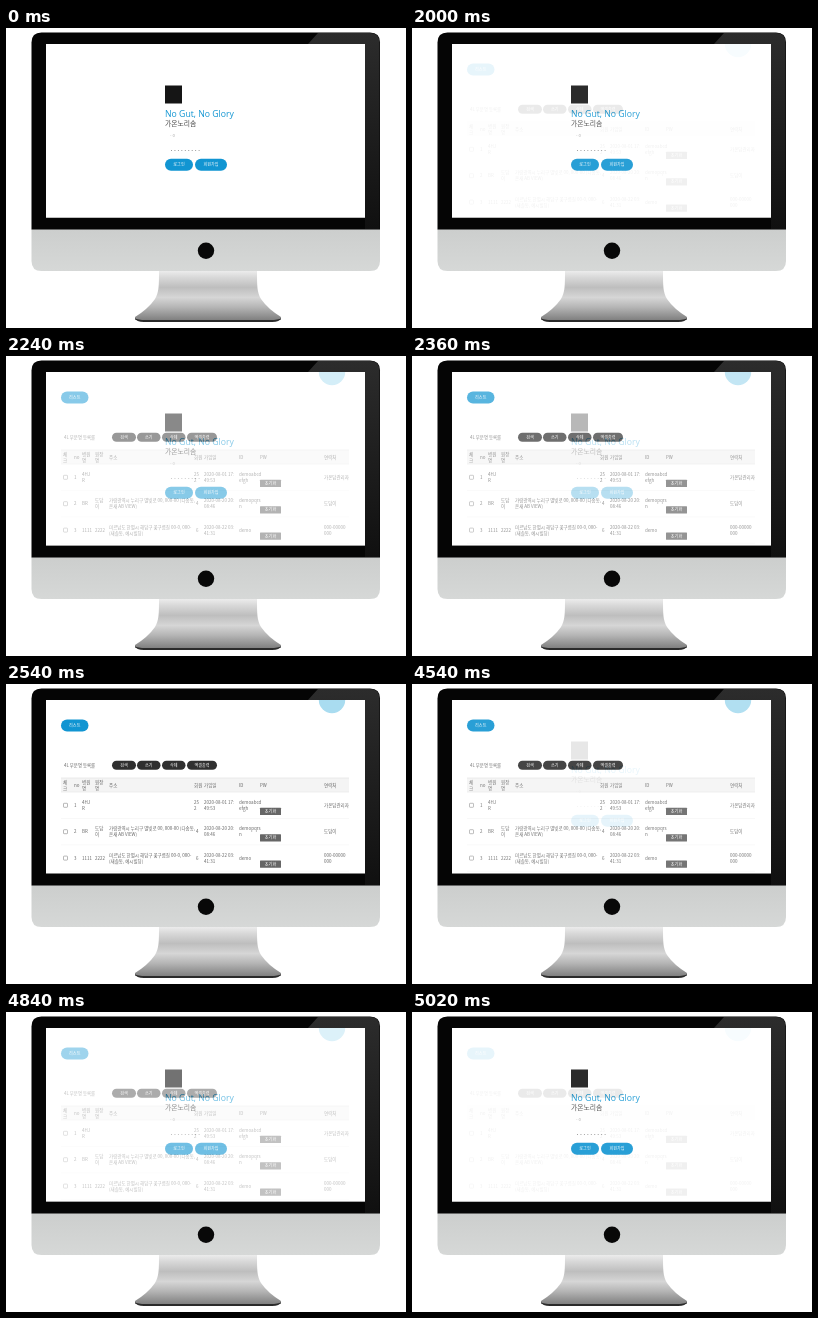
An HTML page that plays this animation: 400 by 300 pixels, repeating every 5080 ms.

```html
<!DOCTYPE html>
<html>
<head>
<meta charset="utf-8">
<title>Desktop screen crossfade</title>
<style>
  html, body { margin: 0; width: 100%; height: 100%; overflow: hidden; background: #fff; }
  svg { display: block; width: 100vw; height: 100vh; }
  text { font-family: "Noto Sans CJK KR", "Noto Sans CJK", "Noto Sans", sans-serif; white-space: pre; }
</style>
</head>
<body>
<svg viewBox="0 0 400 300">
  <defs>
    <linearGradient id="chin" x1="0" y1="0" x2="0" y2="1">
      <stop offset="0" stop-color="#cccecd"/>
      <stop offset="1" stop-color="#d6d8d7"/>
    </linearGradient>
    <linearGradient id="glare" x1="0" y1="0" x2="0" y2="1">
      <stop offset="0" stop-color="#2c2c2c"/>
      <stop offset="1" stop-color="#101010"/>
    </linearGradient>
    <linearGradient id="neck" x1="0" y1="0" x2="0" y2="1">
      <stop offset="0" stop-color="#efefef"/>
      <stop offset=".15" stop-color="#d8d8d8"/>
      <stop offset=".35" stop-color="#bebebe"/>
      <stop offset=".55" stop-color="#d6d6d6"/>
      <stop offset=".75" stop-color="#b4b4b4"/>
      <stop offset="1" stop-color="#808080"/>
    </linearGradient>
    <clipPath id="glass"><rect x="40" y="16" width="319" height="173.5"/></clipPath>
  </defs>

  <path d="M153 242H251C251 258 251 264 255 271Q262 281 275 289V292H129V289Q142 281 149 271C153 264 153 258 153 242Z" fill="url(#neck)"/>
  <path d="M129 290Q131 292 140 292H264Q273 292 275 290Q274 294 266 294H138Q130 294 129 290Z" fill="#2a2a2a"/>
  <path d="M25.5 201H374V233Q374 243 364 243H35.5Q25.5 243 25.5 233Z" fill="url(#chin)"/>
  <path d="M25.5 201.5V14.5Q25.5 4.5 35.5 4.5H364Q374 4.5 374 14.5V201.5Z" fill="#050505"/>
  <path d="M312 5H364Q373.5 5 373.5 14.5V201H359V16H302Z" fill="url(#glare)"/>
  <circle cx="200" cy="222.8" r="8.2" fill="#080808"/>

  <g clip-path="url(#glass)">
    <rect x="40" y="16" width="319" height="174" fill="#fff"/>
    <g id="list"></g>
    <g id="login"><rect x="40" y="16" width="319" height="174" fill="#fff"/></g>
  </g>
</svg>
<script>
const NS = "http://www.w3.org/2000/svg";
const BLUE = "#1195d2";
const list = document.getElementById("list");
const login = document.getElementById("login");

function add(parent, tag, attrs, content) {
  const el = document.createElementNS(NS, tag);
  for (const key in attrs) el.setAttribute(key, attrs[key]);
  if (content) el.textContent = content;
  parent.append(el);
  return el;
}

function label(parent, x, y, content, size = 4.5, fill = "#666", extra = {}) {
  return add(parent, "text", { x, y, "font-size": size, fill, ...extra }, content);
}

// Lines are centred vertically around y.
function cell(x, y, content) {
  const lines = content.split("\n");
  lines.forEach((line, i) => label(list, x, y + 1.6 + (i - (lines.length - 1) / 2) * 6.2, line));
}

function pill(parent, x, y, w, h, fill, content, rx = h / 2) {
  add(parent, "rect", { x, y, width: w, height: h, rx, fill });
  label(parent, x + w / 2, y + h / 2 + 1.5, content, 4.1, "#fff", { "text-anchor": "middle" });
}

function rule(y, stroke) {
  add(list, "path", { d: `M55 ${y}H343`, stroke, "stroke-width": .6 });
}

function buildLogin() {
  add(login, "rect", { x: 159, y: 57.5, width: 17, height: 18, fill: "#151515" });
  label(login, 159, 88.6, "No Gut, No Glory", 8.7, BLUE, { style: 'font-family:"Open Sans",sans-serif' });
  label(login, 159, 98.3, "가온노리솜", 6.8, "#444");
  label(login, 164, 108.8, "- o", 4.2, "#aaa");
  for (let i = 0; i < 9; i++) {
    add(login, "circle", { cx: 165.5 + i * 3.45, cy: 122.5, r: .55, fill: "#888" });
  }
  pill(login, 159, 130.8, 28, 12, BLUE, "로그인");
  pill(login, 189, 130.8, 32, 12, BLUE, "회원가입");
}

function buildList() {
  const columns = [57, 68, 76, 89, 103, 188, 198, 233, 254, 318];
  const header = ["체\n크", "no", "병원\n명", "원장\n명", "주소", "회원", "가입일", "ID", "PW", "연락처"];
  const rows = [
    ["", "1", "4HJ\nR", "", "", "25\n2", "2020-08-01 17:\n49:53", "demoabcd\nefgh", "", "가온담관리자"],
    ["", "2", "BR", "도담\n이", "가람광역시 누리구 별빛로 00, 000-00 (다솜동,\n온새 AB VIEW)", "  4", "2020-08-20 20:\n08:46", "demopqrs\nn", "", "도담이"],
    ["", "3", "1111", "2222", "미르남도 한별시 해담구 꽃구름길 00-0, 000-\n(새솔동, 예시빌딩)", "  6", "2020-08-22 03:\n41:31", "demo", "", "000-00000\n000"]
  ];

  add(list, "circle", { cx: 326, cy: 16, r: 13.2, fill: "#a9dcf0" });
  pill(list, 55, 35.4, 27.5, 12, BLUE, "리스트");
  label(list, 58, 83.2, "4L 부분명 등록률", 4.4);
  [[106, 24, "검색"], [131, 23.5, "쓰기"], [156, 23.5, "삭제"], [181, 30, "엑셀출력"]]
    .forEach(([x, w, name]) => pill(list, x, 76.7, w, 9, "#303030", name));

  add(list, "rect", { x: 55, y: 94, width: 288, height: 14, fill: "#f4f4f4" });
  rule(94, "#ddd");
  rule(108, "#e4e4e4");
  header.forEach((name, i) => cell(columns[i], 101.3, name));

  rows.forEach((row, r) => {
    const y = 121.3 + r * 26.4;
    row.forEach((content, i) => cell(columns[i], y, content));
    add(list, "rect", { x: 57.5, y: y - 2, width: 4, height: 4, rx: .6, fill: "#fff", stroke: "#888", "stroke-width": .6 });
    pill(list, 254, y + 2.5, 21, 7.2, "#666", "초기화", .5);
    rule(y + 13.2, "#f4f4f4");
  });
}

const LOOP = 5080, HOLD = 2000, STEP = 60, STEPS = 10;
const HALF = LOOP / 2;

function render(time) {
  const t = time % LOOP;
  const local = t % HALF;
  const mix = local < HOLD ? 0 : (Math.floor((local - HOLD) / STEP) + 1) / STEPS;
  login.setAttribute("opacity", t < HALF ? 1 - mix : mix);
}

buildLogin();
buildList();
const start = performance.now();
function tick() {
  render(performance.now() - start);
  requestAnimationFrame(tick);
}
tick();
</script>
</body>
</html>
```
